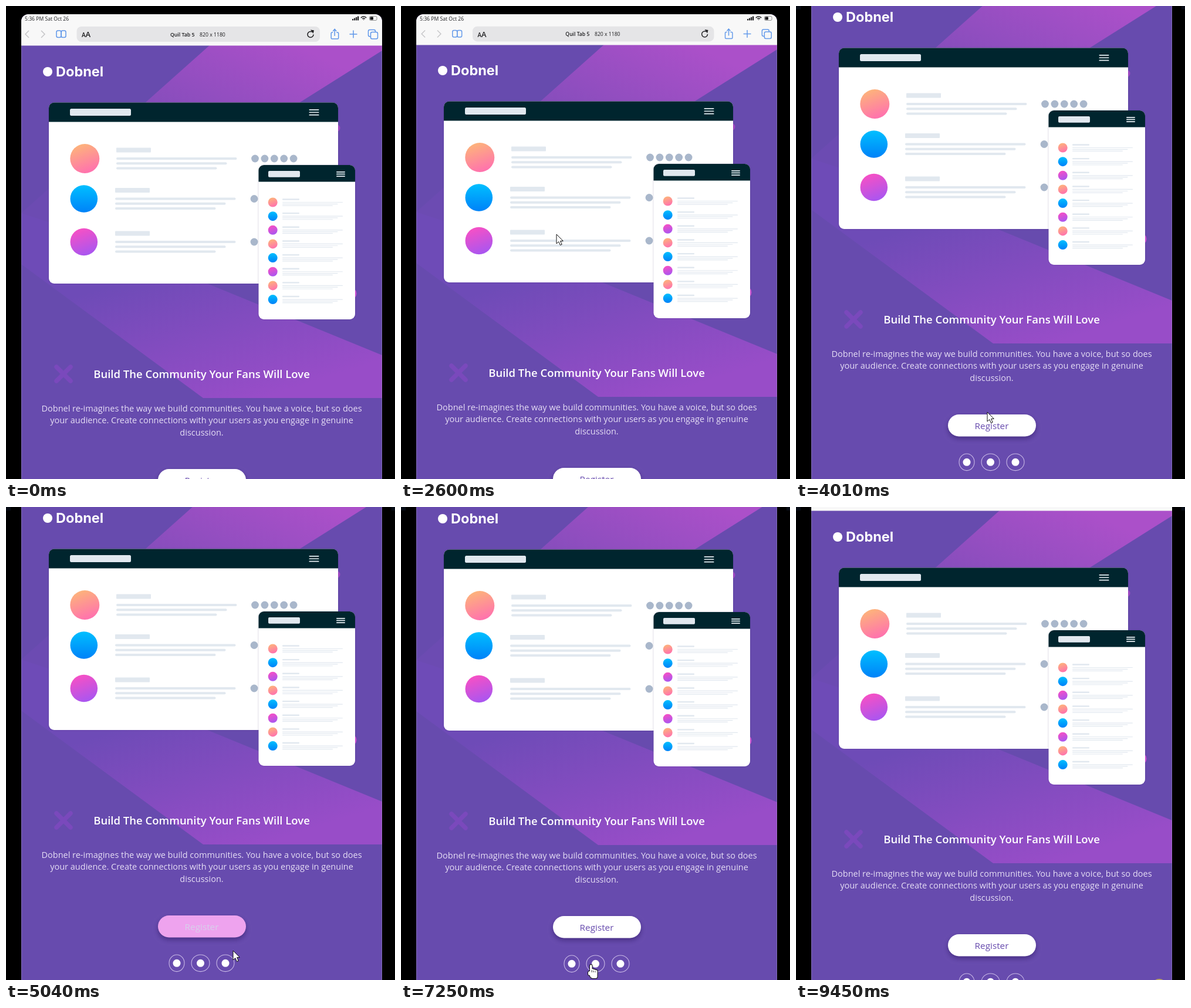
These frames come from a looping animation (663x806 px, 9520 ms). An HTML page with a canvas:

```html
<!DOCTYPE html>
<html lang="en">
<head>
<meta charset="utf-8">
<title>Landing page walkthrough</title>
<style>
html, body { margin: 0; width: 663px; height: 806px; overflow: hidden; background: #000; }
canvas { display: block; }
</style>
</head>
<body>
<canvas id="stage" width="663" height="806"></canvas>
<script>
const ctx = document.getElementById('stage').getContext('2d');
const LOOP = 9520, LEFT = 26, RIGHT = 641, CENTER = 333.5;
const BRAND = 'Dobnel';
const SANS = '"Open Sans", sans-serif';
const PURPLE = [103, 75, 174], WHITE = [255, 255, 255], PINK = [232, 130, 232];
const PALE = '#e1e8ef', INK = '#1c1c1e', BLUE = '#5f97ea', CHROME = '#f8f8f8';
const GRADIENTS = [['#fdb47a', '#ff6fb0'], ['#00bfff', '#0082f8'], ['#f850c4', '#a656f2']];

const clamp = v => Math.min(1, Math.max(0, v));
const lerp = (a, b, p) => a + (b - a) * p;

// Eased 0..1 progress between two times.
function ramp(t, from, to) {
  const p = clamp((t - from) / (to - from));
  return p * p * (3 - 2 * p);
}

const rgb = c => `rgb(${c.map(Math.round)})`;
const mix = (a, b, p) => rgb(a.map((v, i) => lerp(v, b[i], p)));

function linear(x0, y0, x1, y1, [from, to]) {
  const g = ctx.createLinearGradient(x0, y0, x1, y1);
  g.addColorStop(0, from);
  g.addColorStop(1, to);
  return g;
}

function box(x, y, w, h, r, fill) {
  ctx.beginPath();
  ctx.roundRect(x, y, w, h, r);
  ctx.fillStyle = fill;
  ctx.fill();
}

function frame(x, y, w, h, r, color, width) {
  ctx.beginPath();
  ctx.roundRect(x, y, w, h, r);
  ctx.strokeStyle = color;
  ctx.lineWidth = width;
  ctx.stroke();
}

function disc(x, y, r, fill) {
  ctx.beginPath();
  ctx.arc(x, y, r, 0, Math.PI * 2);
  ctx.fillStyle = fill;
  ctx.fill();
}

function arc(x, y, r, from, to, color, width) {
  ctx.beginPath();
  ctx.arc(x, y, r, from * Math.PI, to * Math.PI);
  ctx.strokeStyle = color;
  ctx.lineWidth = width;
  ctx.stroke();
}

function trace(...points) {
  ctx.beginPath();
  points.forEach(p => ctx.lineTo(...p));
}

function poly(fill, ...points) {
  trace(...points);
  ctx.closePath();
  ctx.fillStyle = fill;
  ctx.fill();
}

function line(color, width, ...points) {
  trace(...points);
  ctx.strokeStyle = color;
  ctx.lineWidth = width;
  ctx.stroke();
}

function text(str, x, y, font, fill, align = 'left') {
  ctx.font = font;
  ctx.fillStyle = fill;
  ctx.textAlign = align;
  ctx.fillText(str, x, y);
}

function shadowed(color, blur, dy, draw) {
  ctx.save();
  ctx.shadowColor = color;
  ctx.shadowBlur = blur;
  ctx.shadowOffsetY = dy;
  draw();
  ctx.restore();
}

function backdrop() {
  ctx.fillStyle = rgb(PURPLE);
  ctx.fillRect(LEFT, 0, RIGHT - LEFT, 1000);
  poly(linear(250, 330, 400, 20, ['#6c4bb2', '#ab50c9']),
    [347, 67], [RIGHT, 67], [RIGHT, 76], [150, 385], [LEFT, 440], [LEFT, 353]);
  poly(linear(290, 440, 370, 690, ['#6e4bb7', '#984dc8']),
    [LEFT, 353], [150, 394], [RIGHT, 595], [RIGHT, 668], [336, 668], [LEFT, 440]);
  disc(563, 208, 6.5, '#a348c6');
  disc(587, 490, 10.5, '#d451d6');
  ctx.lineCap = 'round';
  for (const s of [-1, 1]) line('#7a49bc', 7.5, [98 - 12 * s, 615], [98 + 12 * s, 639]);
  ctx.lineCap = 'butt';
}

function card(x, y, w, h, header) {
  shadowed('rgba(30,15,80,.25)', 3, 0, () => box(x, y, w, h, 9, '#fff'));
  box(x, y, w, header, [9, 9, 0, 0], '#00252e');
}

function menu(x, y, w, gap) {
  for (let i = 0; i < 3; i++) box(x, y + i * gap, w, 1.7, 1, '#e6edf2');
}

// An avatar, a title bar and three text lines, each shorter than the last.
function listItem(x, y, r, kind, textX, titleW, titleH, rise, lineW, lineH, gap, step) {
  const tilt = kind === 1 ? 0 : r * 0.35;
  disc(x, y, r, linear(x - tilt, y - r, x + tilt, y + r, GRADIENTS[kind]));
  box(textX, y - rise, titleW, titleH, 1, PALE);
  for (let n = 0; n < 3; n++) box(textX, y + n * gap - lineH / 2, lineW - n * step, lineH, lineH / 2, PALE);
}

function mockup() {
  card(73, 164.5, 493, 308.5, 33);
  box(109, 175, 104, 12, 2.5, PALE);
  menu(516.5, 176, 17, 4.4);
  [260, 328.5, 402].forEach((y, i) => {
    listItem(i ? 132.8 : 134.3, y, i ? 23.3 : 25, i, i ? 186 : 188, 59, 8, 18.5, 205.5, 4, 8.2, 17);
    for (let n = 0; n < (i ? 1 : 5); n++) disc((i ? 423 : 424.5) + n * 16.4, y, 6.4, '#a9b7cb');
  });

  card(430.5, 271, 164.5, 263, 28.5);
  box(447, 281, 54, 10.7, 2, PALE);
  menu(563, 282, 15, 3.6);
  for (let i = 0; i < 8; i++) listItem(454.7, 334.5 + i * 23.65, 8, i % 3, 471, 29, 2.4, 6.2, 103, 1.2, 2.8, 8.5);
}

const button = { x: 259, y: 789, w: 150, h: 37.5 };
const logo = { x: 61, y: 104, w: 106, h: 18 };
const badges = [[291, 13], [331.5, 15.5], [374, 15]]
  .map(([cx, rx]) => ({ cx, x: cx - rx, y: 856, w: rx * 2, h: 28.6 }));

function page(hover) {
  backdrop();
  disc(71, 112, 8, '#fff');
  text(BRAND, 85, 119.5, '700 23.5px Inter, sans-serif', '#fff');
  mockup();
  text('Build The Community Your Fans Will Love', CENTER, 633.5, `600 18.5px ${SANS}`, '#fff', 'center');
  [
    `${BRAND} re-imagines the way we build communities. You have a voice, but so does`,
    'your audience. Create connections with your users as you engage in genuine',
    'discussion.'
  ].forEach((s, i) => text(s, CENTER, 690.7 + i * 20.7, `14.5px ${SANS}`, '#e6def5', 'center'));

  const { x, y, w, h } = button;
  shadowed('rgba(40,20,90,.5)', 9, 4, () => box(x, y, w, h, h / 2, mix(WHITE, PINK, hover)));
  text('Register', CENTER, 813.5, `15.3px ${SANS}`, mix(PURPLE, WHITE, hover), 'center');

  for (const b of badges) {
    const cy = b.y + b.h / 2;
    ctx.beginPath();
    ctx.ellipse(b.cx, cy, b.w / 2, b.h / 2, 0, 0, Math.PI * 2);
    ctx.strokeStyle = '#c9b9e6';
    ctx.lineWidth = 1.1;
    ctx.stroke();
    disc(b.cx, cy, 6.5, '#fff');
  }
}

function statusBar() {
  text('5:36 PM Sat Oct 26', 32, 24.8, `8.6px ${SANS}`, INK);
  for (let i = 0; i < 4; i++) box(590 + i * 3, 22 - i * 1.5, 2.2, 2.5 + i * 1.5, 0.5, INK);
  for (const r of [0.6, 3, 6]) arc(609.5, 24, r, -0.78, -0.22, INK, 1.5);
  frame(619.5, 17.5, 12.5, 7, 2, '#777', 0.8);
  box(620.5, 18.5, 5.5, 5, 1, INK);
}

function toolbar(collapse) {
  const cy = 48;
  ctx.save();
  ctx.translate(327.5, cy - 5 * collapse);
  ctx.scale(1 - 0.08 * collapse, 1 - 0.08 * collapse);
  ctx.translate(-327.5, -cy);
  box(120.5, 35, 414.5, 26, 8, '#e5e5e7');
  text('Quil Tab 5', 280, 51.5, `600 8.7px ${SANS}`, INK);
  text('820 x 1180', 330, 51.5, `8.7px ${SANS}`, INK);

  ctx.globalAlpha = 1 - 0.45 * collapse;
  for (const [x, d] of [[36, 3], [63, -3]]) line('#c6c6c8', 1.5, [x + d, cy - 6], [x - d, cy], [x + d, cy + 6]);
  text('A', 129, 53, `600 10px ${SANS}`, INK);
  text('A', 135.5, 53, `600 13px ${SANS}`, INK);
  for (const x of [86, 94]) frame(x, 42, 8, 11.5, 2.5, BLUE, 1.5);

  const share = 560.2;
  frame(share - 6, 45, 12.5, 11, 1.5, BLUE, 1.5);
  box(share - 3, 43, 6, 4, 0, CHROME);
  line(BLUE, 1.5, [share, 51], [share, 40]);
  line(BLUE, 1.5, [share - 3, 43], [share, 39.5], [share + 3, 43]);
  line(BLUE, 1.5, [585.5, cy], [598.5, cy]);
  line(BLUE, 1.5, [592, cy - 6.5], [592, cy + 6.5]);
  for (const d of [0, 4]) {
    box(617.5 + d, 40.5 + d, 12, 11.5, 2.5, CHROME);
    frame(617.5 + d, 40.5 + d, 12, 11.5, 2.5, BLUE, 1.5);
  }
  arc(519, 48.5, 5, 0, 1.65, INK, 1.5);
  poly(INK, [519, 40.5], [525, 41.5], [523.5, 47]);
  ctx.restore();
}

function arrow() {
  poly('#fff', [0, 0], [0, 16], [3.8, 12.6], [6.4, 18.5], [9.2, 17.3], [6.6, 11.6], [11.3, 11.4]);
  ctx.strokeStyle = '#111';
  ctx.lineWidth = 1;
  ctx.stroke();
}

function hand() {
  ctx.beginPath();
  for (let i = 0; i < 4; i++) {
    const top = i ? 6 + i : 0;
    ctx.roundRect(-2 + i * 3, top, 3.6, 17 - top, 1.8);
  }
  ctx.roundRect(-5, 11, 5, 7, 2.5);
  ctx.roundRect(-2, 11, 12.5, 12, [0, 2, 3, 5]);
  ctx.strokeStyle = '#111';
  ctx.lineWidth = 2;
  ctx.stroke();
  ctx.fillStyle = '#fff';
  ctx.fill();
  for (let i = 1; i < 4; i++) line('#111', 0.8, [-1.8 + i * 3, 8 + i], [-1.8 + i * 3, 13]);
}

// Each move: start time, end time, destination.
const moves = [
  [70, 600, 314, 154], [600, 1010, 80, 122], [1080, 1360, 134, 108], [1950, 2450, 265, 389],
  [3520, 4100, 330, 712], [4700, 5040, 387, 756], [5100, 6400, 290, 779],
  [7100, 7820, 593, 786], [8360, 8430, 594, 763], [8900, 9200, 622, 812]
];

function cursorAt(t) {
  return moves.reduce(([x, y], [from, to, toX, toY]) => {
    const p = ramp(t, from, to);
    return [lerp(x, toX, p), lerp(y, toY, p)];
  }, [660, 736]).map(Math.round);
}

function drawCursor(t, shift) {
  const [x, y] = cursorAt(t);
  const inside = b => x > b.x && x < b.x + b.w && y + shift > b.y && y + shift < b.y + b.h;
  ctx.save();
  ctx.translate(x, y);
  ([logo, button, ...badges].some(inside) ? hand : arrow)();
  ctx.restore();
}

function render(t) {
  const collapse = ramp(t, 2500, 3040) - ramp(t, 8020, 8400);
  const lift = Math.round(67 * ramp(t, 3180, 3520) - (t > 5250) - 5 * ramp(t, 8020, 8400));
  const shift = Math.round(26 * collapse) + lift;
  const hover = ramp(t, 4050, 4380) - ramp(t, 4930, 5260);

  ctx.fillStyle = '#000';
  ctx.fillRect(0, 0, 663, 806);
  if (lift > 40) for (const x of [0, 657]) box(x, 0, 8, 6, 0, '#070c15');

  ctx.save();
  ctx.beginPath();
  ctx.roundRect(LEFT, 14 - lift, RIGHT - LEFT, 1000, 12);
  ctx.clip();
  ctx.save();
  ctx.translate(0, -shift);
  page(hover);
  ctx.restore();
  ctx.translate(0, -lift);
  box(LEFT, 0, RIGHT - LEFT, 67.5 - 10 * collapse, 0, CHROME);
  statusBar();
  toolbar(collapse);
  ctx.restore();
  for (const x of [LEFT + 0.5, RIGHT - 0.5]) line('rgba(190,185,215,.3)', 1, [x, 67 - lift], [x, 806]);

  if (t >= 70 && t < 9200) drawCursor(t, shift);
  if (t >= 9450) disc(619, 817, 13, '#b9a45c');
}

const start = performance.now();
function tick() {
  render((performance.now() - start) % LOOP);
  requestAnimationFrame(tick);
}
tick();
</script>
</body>
</html>
```
